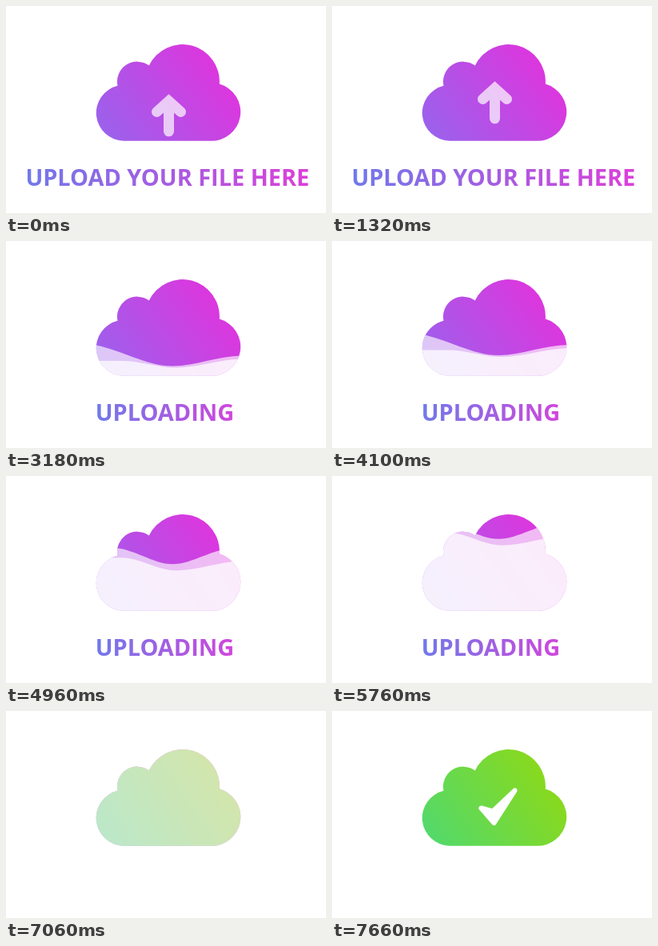
These frames come from a looping animation (400x259 px, 8460 ms). An HTML page:

```html
<!DOCTYPE html>
<html lang="en">
<head>
<meta charset="utf-8">
<title>Cloud upload</title>
<style>
  html, body { margin: 0; width: 100%; height: 100%; overflow: hidden; background: #fff; }
  svg { display: block; width: 100%; height: 100%; }
  text { font: 700 28.9px "Open Sans", sans-serif; }
</style>
</head>
<body>
<svg viewBox="0 0 400 259">
  <defs>
    <path id="shape" d="M147 168.8A35 35 0 0 1 139.5 99.8A25 25 0 0 1 178.8 74.5A46.3 46.3 0 0 1 266.8 97.6A36.3 36.3 0 0 1 255.5 168.8Z"/>
    <clipPath id="inside"><use href="#shape"/></clipPath>
    <linearGradient id="violet" gradientUnits="userSpaceOnUse" x1="120" y1="162" x2="258" y2="62">
      <stop stop-color="#9a62ec"/><stop offset="1" stop-color="#dd36de"/>
    </linearGradient>
    <linearGradient id="green" gradientUnits="userSpaceOnUse" x1="125" y1="165" x2="270" y2="70">
      <stop stop-color="#53d96b"/><stop offset="1" stop-color="#8bd91a"/>
    </linearGradient>
    <linearGradient id="promptInk" gradientUnits="userSpaceOnUse" x1="25" y1="0" x2="378" y2="0">
      <stop stop-color="#7079ea"/><stop offset="1" stop-color="#dc3fda"/>
    </linearGradient>
    <linearGradient id="busyInk" gradientUnits="userSpaceOnUse" x1="112" y1="0" x2="285" y2="0">
      <stop stop-color="#7079ea"/><stop offset="1" stop-color="#d046dc"/>
    </linearGradient>
  </defs>
  <rect width="400" height="259" fill="#fff"/>
  <g id="violetCloud" clip-path="url(#inside)">
    <rect x="100" y="40" width="200" height="140" fill="url(#violet)"/>
    <g id="arrow" opacity=".7" fill="none" stroke="#fff" stroke-width="13" stroke-linecap="round">
      <path d="M188.5 22.5L203.5 8.9L218.5 22.5M203.5 12V46.8"/>
    </g>
    <path id="back" fill="#fff" fill-opacity=".65"/>
    <path id="front" fill="#fff" fill-opacity=".73"/>
  </g>
  <use id="greenCloud" href="#shape" fill="url(#green)"/>
  <path id="check" d="M186.5 121.5L201 125.5L228.5 99.5L202.5 140Z" fill="#fff" stroke="#fff" stroke-width="6" stroke-linejoin="round"/>
  <text id="prompt" x="24.4" y="224.8" fill="url(#promptInk)">UPLOAD YOUR FILE HERE</text>
  <text id="busy" x="111.7" y="224.8" fill="url(#busyInk)">UPLOADING</text>
</svg>
<script>
const LOOP = 8460, TICK = 40;
const [violetCloud, greenCloud, arrow, back, front, check, prompt, busy] =
  ["violetCloud", "greenCloud", "arrow", "back", "front", "check", "prompt", "busy"]
    .map(id => document.getElementById(id));

const mix = (a, b, u) => a + (b - a) * u;
const part = (t, from, to) => Math.min(1, Math.max(0, (t - from) / (to - from)));
const smooth = u => u * u * (3 - 2 * u);
const easeOut = u => 1 - (1 - u) ** 5;
const popOut = u => 1 + 2.2 * (u - 1) ** 3 + 1.2 * (u - 1) ** 2;
const show = (node, on) => { node.style.display = on ? "" : "none"; };

// Settles, floats up and back, then sinks through the cloud's floor.
function arrowTop(t) {
  const settle = smooth(part(t, 0, 440));
  const lift = smooth(part(t, 860, 1320)) - smooth(part(t, 1780, 2280));
  return 110 + 1.5 * settle - 17.5 * lift + 64 * part(t, 2600, 2880);
}

// Surges in, then rises at a steady speed.
function waterLevel(t) {
  return mix(197, 143, easeOut(part(t, 2860, 4100))) - 0.0394 * Math.max(0, t - 4130);
}

// Fills below a curve that is level at each crest and trough.
function wave(points, level) {
  let [px, py] = [points[0][0], level + points[0][1]];
  let d = `M90 ${py}H${px}`;
  for (const [x, dy] of points.slice(1)) {
    const y = level + dy, third = (x - px) / 3;
    d += `C${px + third} ${py} ${x - third} ${y} ${x} ${y}`;
    [px, py] = [x, y];
  }
  return d + "H310V270H90Z";
}

function draw(t) {
  arrow.setAttribute("transform", `translate(0 ${arrowTop(t)})`);
  show(arrow, t < 2880);

  const level = waterLevel(t), m = smooth(part(t, 4100, 4960));
  back.setAttribute("d", wave([
    [mix(95, 135, m), mix(-28, -20, m)], [208, 0], [mix(295, 285, m), mix(-13, -20, m)]
  ], level));
  front.setAttribute("d", wave([
    [145, mix(-8.5, -16, m)], [212, 0], [298, mix(-11, -12, m)]
  ], level + mix(2, 8, m)));

  const swap = part(t, 2860, 3140);
  prompt.style.opacity = 1 - swap;
  busy.style.opacity = t < 6820 ? swap : 0;

  const done = part(t, 6940, 7220);
  greenCloud.style.opacity = done;
  show(violetCloud, done < 1);

  const size = popOut(part(t, 7340, 7660));
  check.setAttribute("transform", `translate(207.5 120) scale(${size}) translate(-207.5 -120)`);
  show(check, t > 7340);
}

const start = performance.now();
function frame() {
  const t = (performance.now() - start) % LOOP;
  draw(Math.floor(t / TICK) * TICK);
  requestAnimationFrame(frame);
}
frame();
</script>
</body>
</html>
```
